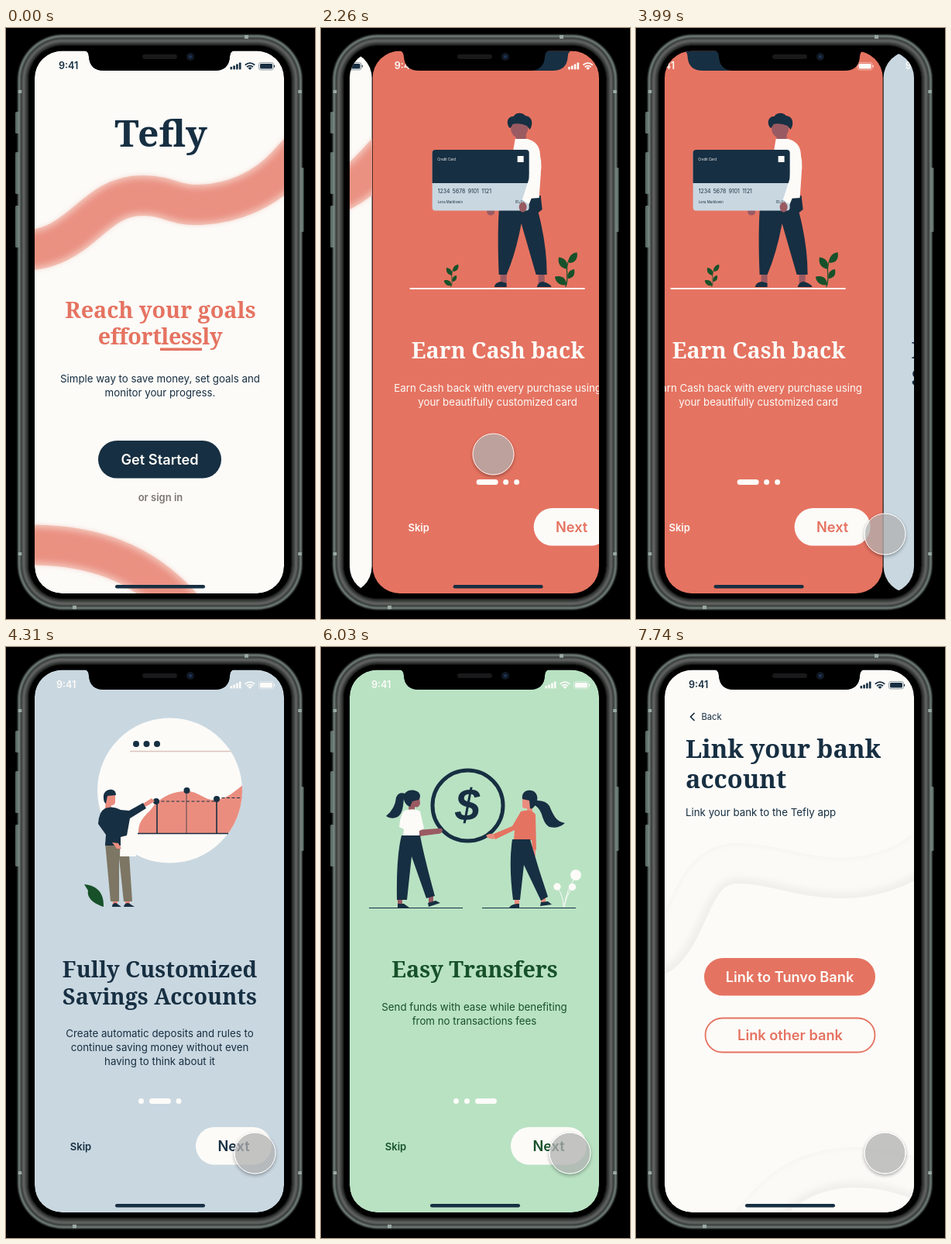
Animation, 399 px wide and 762 px high, one loop 8000 ms. Source, as an HTML page:

```html
<!DOCTYPE html>
<html lang="en">
<head>
<meta charset="utf-8">
<title>Onboarding</title>
<style>
  html, body { margin: 0; width: 100%; height: 100%; overflow: hidden; background: #000; }
  svg { display: block; position: absolute; left: 0; top: 0; }
  svg text { font-family: Inter, "Open Sans", sans-serif; font-size: 13.3px; }
  svg .title { font: 600 28.7px "Noto Serif", serif; }
  svg .big { font-size: 32.5px; }
  svg .logo { font-size: 48px; }
  svg .btn { font-weight: 600; font-size: 18.2px; }
  svg .link { font-weight: 600; font-size: 13px; }
  svg .time { font-weight: 600; font-size: 12.6px; }
  .mid { text-anchor: middle; }
  .navy { fill: #172f42; }
  .coral { fill: #e57361; }
  .cream { fill: #fcfbf8; }
  .green { fill: #17512a; }
  .skin { fill: #9a5a62; }
  .peach { fill: #ea8d7f; }
  .wave path { fill: none; stroke-width: 52; }
  .wave path + path { stroke-width: 45; filter: url(#soft); }
  .line { fill: none; stroke: #172f42; }
  #cursor {
    position: absolute; left: -27.5px; top: -27.5px; width: 52px; height: 52px;
    border: 1.5px solid #fff; border-radius: 50%;
    background: rgba(176, 176, 176, .75); background-clip: padding-box;
    box-shadow: 0 2px 4px rgba(0, 0, 0, .32); visibility: hidden;
  }
</style>
</head>
<body>
<svg width="399" height="762" viewBox="0 0 399 762">
  <defs>
    <clipPath id="screen"><rect x="37" y="29.500" width="322" height="699.500" rx="35"/></clipPath>
    <clipPath id="disc"><circle cx="211.500" cy="185" r="93.500"/></clipPath>
    <filter id="soft" x="-20%" y="-40%" width="140%" height="180%"><feGaussianBlur stdDeviation="4"/></filter>
    <filter id="sheen"><feGaussianBlur stdDeviation=".9"/></filter>
    <path id="notch" d="M98 28Q107 29 107 37Q108 55 127 55H269Q288 55 289 37Q289 29 298 28Z"/>
    <path id="leaf" d="M0 0C-7-3-8-10-5-15C2-12 4-6 0 0Z"/>
    <g id="chrome">
      <use href="#notch" class="navy"/>
      <rect class="navy" x="141" y="718" width="116" height="4.500" rx="2.250"/>
      <g fill="currentColor">
        <rect x="289.500" y="50" width="2.600" height="3.500" rx=".7"/>
        <rect x="293.300" y="48.500" width="2.600" height="5" rx=".7"/>
        <rect x="297.100" y="46.500" width="2.600" height="7" rx=".7"/>
        <rect x="300.900" y="44.500" width="2.600" height="9" rx=".7"/>
        <path d="M315 54l-2.500-2.600q2.500-2 5 0z"/>
        <rect x="328" y="46" width="16" height="6.500" rx="1.500"/>
        <rect x="346" y="47.800" width="1" height="3" rx=".5"/>
      </g>
      <g fill="none" stroke="currentColor">
        <path stroke-width="1.800" d="M308.800 47.800q6.200-5.400 12.400 0M311 50.200q4-3.200 8 0"/>
        <rect x="326.500" y="44.500" width="19" height="9.500" rx="2.800" opacity=".45"/>
      </g>
    </g>
    <g id="next">
      <rect class="cream" x="245" y="619" width="98" height="48.500" rx="24.250"/>
      <text class="btn mid" x="294" y="650" fill="currentColor">Next</text>
    </g>
    <g id="sprig">
      <path d="M0 0C4-8-2-14 4-25" fill="none" stroke="#17512a" stroke-width=".8"/>
      <g class="green">
        <use href="#leaf" transform="translate(3 -20) rotate(55) scale(.7)"/>
        <use href="#leaf" transform="translate(1 -15) rotate(-15) scale(.75)"/>
        <use href="#leaf" transform="translate(2 -7) rotate(52) scale(.6)"/>
        <use href="#leaf" transform="translate(1 -2) rotate(-38) scale(.75)"/>
      </g>
    </g>
  </defs>

  <!-- Phone body -->
  <g fill="#596a64">
    <rect x="12" y="108" width="5" height="28" rx="1.500"/><rect x="12" y="160" width="5" height="54" rx="1.500"/>
    <rect x="12" y="229" width="5" height="54" rx="1.500"/><rect x="380" y="180" width="4.500" height="83" rx="1.500"/>
  </g>
  <g filter="url(#sheen)">
    <rect x="15.500" y="9" width="366.500" height="740.500" rx="58" fill="#84938c"/>
    <rect x="18" y="11.500" width="361.500" height="735.500" rx="55.500" fill="#2a2f2d"/>
    <rect x="21" y="14.500" width="355.500" height="729.500" rx="52.500" fill="#646665"/>
    <rect x="24.500" y="18" width="348.500" height="722.500" rx="49" fill="#3a3c3b"/>
    <rect x="28" y="21.500" width="341.500" height="715.500" rx="45"/>
  </g>
  <path d="M308 11.500h5M86 747h5M18 80v4M379.500 80v4M18 676v4M379.500 676v4" stroke="#9aaba4" stroke-width="4.500"/>

  <g clip-path="url(#screen)">
    <g id="strip">
      <!-- Welcome -->
      <g class="page" clip-path="url(#screen)">
        <rect class="cream" width="399" height="762"/>
        <g class="wave">
          <path d="M10 287C98 292 108 216 176 216C210 216 215 228 245 228C292 228 335 208 362 178L410 126" stroke="#f4cabf"/>
          <path d="M10 287C98 292 108 216 176 216C210 216 215 228 245 228C292 228 335 208 362 178L410 126" stroke="#ea9182"/>
        </g>
        <g class="wave">
          <path d="M10 667C110 662 180 690 232 752" stroke="#f4cabf"/>
          <path d="M10 667C110 662 180 690 232 752" stroke="#ea9182"/>
        </g>
        <use href="#chrome" color="#172f42"/>
        <text class="time navy" x="68" y="53">9:41</text>
        <text class="title logo navy mid" x="200" y="153">Tefly</text>
        <g class="coral mid">
          <text class="title" x="199.500" y="374">Reach your goals</text>
          <text class="title" x="199" y="408" letter-spacing="-.4">effortlessly</text>
          <rect x="199" y="412.500" width="54" height="3.500"/>
        </g>
        <g class="navy mid">
          <text x="199" y="457">Simple way to save money, set goals and</text>
          <text x="199" y="475">monitor your progress.</text>
        </g>
        <rect class="navy" x="119" y="532" width="159" height="48.500" rx="24.250"/>
        <text class="btn cream mid" x="198.500" y="562.500">Get Started</text>
        <text class="link mid" x="199.500" y="609.500" fill="#7d7672">or sign in</text>
      </g>

      <!-- Cash back -->
      <g class="page" clip-path="url(#screen)">
        <rect class="coral" width="399" height="762"/>
        <use href="#chrome" color="#fcfbf8"/>
        <text class="time cream" x="65" y="53">9:41</text>
        <use href="#sprig" x="138" y="334"/>
        <use href="#sprig" transform="translate(286 334) scale(1.550)"/>
        <g class="skin">
          <path d="M202 315h8v14h-8zM251 315h8v14h-8z"/>
          <ellipse cx="189.500" cy="237" rx="5" ry="4.500"/>
          <path d="M222 136h13v14h-13z"/>
          <ellipse cx="226.500" cy="130" rx="11" ry="11.500"/>
        </g>
        <g class="navy">
          <path d="M209 220L254 216L256 234L251 238Q262 280 262 318H248L229 252Q222 290 210 318H200Q198 270 200 236Z"/>
          <path d="M194 334Q195 328 203 327L210 329V334ZM249 334Q251 327 257 327Q267 330 268 334Z"/>
          <path d="M213 128C208 119 214 113 219 114C222 108 232 109 234 113C243 114 245 123 240 131L236 126Q226 122 218 124L215 129Z"/>
        </g>
        <path class="cream" d="M221 143H237Q251 147 253 160L254 190L252 219L208 222Z"/>
        <rect x="114" y="157" width="125" height="78.500" rx="4" fill="#c9d7e0"/>
        <path class="navy" d="M114 200V161Q114 157 118 157H235Q239 157 239 161V200Z"/>
        <text class="cream" x="120.500" y="171" style="font-size:4.400px">Credit Card</text>
        <rect class="cream" x="224" y="165" width="8" height="8"/>
        <text class="navy" x="121" y="213" style="font-size:6.900px;word-spacing:1.500px">1234 5678 9101 1121</text>
        <text class="navy" x="121" y="226" style="font-size:4.300px">Lena Marblewin</text>
        <text class="navy" x="221" y="226" style="font-size:4.300px">05/23</text>
        <ellipse class="skin" cx="231" cy="231" rx="5" ry="6.500"/>
        <path class="cream" d="M241 158L253 162Q257 180 252 196L239 227L230 222L239 194Z"/>
        <path class="cream" d="M85 335h226v2H85z"/>
        <g class="cream mid">
          <text class="title" x="199" y="426">Earn Cash back</text>
          <text x="198.500" y="468.500">Earn Cash back with every purchase using</text>
          <text x="198.500" y="486.500">your beautifully customized card</text>
          <rect x="171" y="582" width="28" height="7" rx="3.500"/>
          <circle cx="209" cy="585.500" r="3.500"/><circle cx="223" cy="585.500" r="3.500"/>
          <text class="link" x="96.500" y="648.500">Skip</text>
        </g>
        <use href="#next" color="#e57361"/>
      </g>

      <!-- Savings -->
      <g class="page" clip-path="url(#screen)">
        <rect width="399" height="762" fill="#c9d7e0"/>
        <use href="#chrome" color="#fcfbf8"/>
        <text class="time cream" x="65" y="53">9:41</text>
        <g clip-path="url(#disc)">
          <path class="cream" d="M110 90h200v190H110z"/>
          <path d="M160 134.500H310" stroke="#dcc4bd" stroke-width="1.500"/>
          <path class="peach" d="M171 240C171 220 183 217 192 203C204 190 222 185 235 186C250 187 258 199 272 197C288 194 292 188 306 178L286 241Z"/>
          <path class="peach" d="M285 196L306 178V241H285Z"/>
          <path class="line" stroke-dasharray="4 2.500" d="M194 199H272M272 194.500H306"/>
        </g>
        <path class="line" stroke-width="1.600" d="M170 240.500H287M195 199V240M272 196V240"/>
        <path class="line" stroke-width=".7" d="M233 186V240"/>
        <g class="navy">
          <circle cx="168" cy="125" r="4"/><circle cx="181.500" cy="125" r="4"/><circle cx="195" cy="125" r="4"/>
          <circle cx="194" cy="199" r="4"/><circle cx="233.500" cy="185" r="4"/><circle cx="272" cy="196" r="4"/>
        </g>
        <path class="green" d="M101 306C114 307 127 314 126 335C113 331 104 323 106 314Z"/>
        <path class="peach" d="M177 202L188 195L192 199L180 206ZM129 190h12v11q-2 4-5 3l-1 6h-7zM138 326h6v6h-6zM154 326h6v6h-6z"/>
        <path d="M128 252H158L163 328H152L146 272L146 328H135Z" fill="#7d7664"/>
        <path class="cream" d="M148 244H168V270H147Z"/>
        <g class="navy">
          <path d="M126 195C125 186 132 183 137 184Q142 185 142 191L131 192L129 202Q126 200 126 195Z"/>
          <path d="M128 208Q138 204 148 210L159 211L177 201L181 208L160 221L156 243L148 245V256H128L129 242L119 228Q120 212 128 208Z"/>
          <path d="M137 335Q137 330 142 330L149 335ZM152 335Q153 330 158 330L166 335Z"/>
        </g>
        <path class="peach" d="M137 252L145 253L149 260L143 260Z"/>
        <g class="navy mid">
          <text class="title" x="198.500" y="426">Fully Customized</text>
          <text class="title" x="198.500" y="461">Savings Accounts</text>
          <text x="198.500" y="503">Create automatic deposits and rules to</text>
          <text x="198.500" y="521">continue saving money without even</text>
          <text x="198.500" y="539">having to think about it</text>
          <text class="link" x="96.500" y="648.500">Skip</text>
        </g>
        <g class="cream">
          <circle cx="174.500" cy="585.500" r="3.500"/><circle cx="223" cy="585.500" r="3.500"/>
          <rect x="185" y="582" width="28" height="7" rx="3.500"/>
        </g>
        <use href="#next" color="#172f42"/>
      </g>

      <!-- Transfers -->
      <g class="page" clip-path="url(#screen)">
        <rect width="399" height="762" fill="#b9e2c3"/>
        <use href="#chrome" color="#fcfbf8"/>
        <text class="time cream" x="65" y="53">9:41</text>
        <circle class="line" cx="189.500" cy="204.500" r="45.500" stroke-width="5"/>
        <text class="navy mid" x="189" y="224" style="font:italic bold 57px 'Liberation Sans',sans-serif">$</text>
        <path class="line" d="M62 336.500H183M208 336.500H329"/>
        <path d="M314 335Q317 312 329 296M313 335Q313 320 305 310M314 335Q317 320 324 311" fill="none" stroke="#fcfbf8"/>
        <g class="cream">
          <circle cx="329" cy="294" r="7"/><circle cx="305" cy="309" r="4.700"/><circle cx="324.500" cy="309.500" r="4.700"/>
        </g>
        <path class="skin" d="M114 193H127L128 202Q126 208 121 206V212H113ZM125 236L151 234Q157 233 157 237Q156 241 150 241L127 244ZM99 323h6v10h-6zM139 320h6v10h-6z"/>
        <path class="cream" d="M107 211Q121 207 128 212L133 234L127 237V244H106L107 235L101 232Q102 218 107 211Z"/>
        <g class="navy">
          <path d="M104 243H128Q133 270 147 321L136 324L117 270L111 326H98Q97 270 104 243Z"/>
          <path d="M99 336V331H107L114 336ZM139 335L138 330L148 327L154 330Z"/>
          <path d="M107 197C105 188 113 183 121 185C128 186 130 193 126 197L118 199L115 206Q109 204 107 197Z"/>
          <path d="M109 189Q100 186 97 194Q96 208 84 218Q91 223 99 219C106 214 106 204 107 195Z"/>
        </g>
        <path class="peach" d="M260 193H273V212H266V208Q259 209 260 202ZM213 243Q219 239 225 242V247Q217 249 213 243ZM273 256h4v14l-3-2zM250 322h6v10h-6zM284 320h6v10h-6z"/>
        <path class="coral" d="M258 212Q272 208 277 216L278 262L273 260L272 249H249L250 236L225 248L223 241L247 231Z"/>
        <g class="navy">
          <path d="M247 248H270Q280 284 293 322L284 327L262 281L257 326H248Q242 280 247 248Z"/>
          <path d="M243 336Q246 331 256 331V336ZM283 334L284 329L293 328L298 332Z"/>
          <path d="M260 196C259 188 264 184 271 185C280 186 282 197 276 205Q272 210 270 208L269 198Z"/>
          <path d="M277 198Q290 197 295 205C301 219 304 225 315 227Q306 235 295 232C284 226 288 211 276 204Z"/>
        </g>
        <g class="green mid">
          <text class="title" x="198.500" y="426">Easy Transfers</text>
          <text x="198" y="468.500">Send funds with ease while benefiting</text>
          <text x="198" y="486.500">from no transactions fees</text>
          <text class="link" x="96.500" y="648.500">Skip</text>
        </g>
        <g class="cream">
          <circle cx="174.500" cy="585.500" r="3.500"/><circle cx="188.500" cy="585.500" r="3.500"/>
          <rect x="199" y="582" width="28" height="7" rx="3.500"/>
        </g>
        <use href="#next" color="#17512a"/>
      </g>

      <!-- Link bank -->
      <g class="page" clip-path="url(#screen)">
        <rect class="cream" width="399" height="762"/>
        <g class="wave">
          <path d="M20 402C72 380 65 279 130 279C180 279 210 298 265 298C300 298 340 288 370 263" stroke="#f1efeb"/>
          <path d="M16 399C68 377 61 276 130 275C180 275 210 294 265 294C300 294 340 284 374 256" stroke="#fbfaf7"/>
        </g>
        <g class="wave">
          <path d="M150 742C190 690 230 672 280 671C320 671 350 680 370 690" stroke="#f1efeb"/>
          <path d="M146 740C186 687 230 668 280 667C320 667 350 676 376 688" stroke="#fbfaf7"/>
        </g>
        <use href="#chrome" color="#172f42"/>
        <g class="navy">
          <text class="time" x="68" y="53">9:41</text>
          <path class="line" stroke-width="1.700" d="M75.500 85L70.500 90L75.500 95"/>
          <text x="84.500" y="94" style="font-size:11.200px">Back</text>
          <text class="title big" x="64" y="143">Link your bank</text>
          <text class="title big" x="64" y="182">account</text>
          <text x="64" y="217.500">Link your bank to the Tefly app</text>
        </g>
        <rect class="coral" x="88" y="401" width="221" height="48.500" rx="24.250"/>
        <text class="btn cream mid" x="198.500" y="432">Link to Tunvo Bank</text>
        <rect x="89.500" y="478.500" width="219" height="44" rx="22" fill="none" stroke="#e57361" stroke-width="1.800"/>
        <text class="btn coral mid" x="199" y="507">Link other bank</text>
      </g>
    </g>
  </g>

  <!-- Notch hardware -->
  <use href="#notch"/>
  <rect x="176" y="34" width="45" height="6" rx="3" fill="#19191b"/>
  <circle cx="238" cy="37" r="5" fill="#111925"/><circle cx="238" cy="37" r="2" fill="#1f3558"/>
</svg>
<div id="cursor"></div>

<script>
  const LOOP = 8000, PAGE = 323;
  const pushes = [[1850, 2400, 8], [3840, 4310, 7], [5640, 6030, 6], [7420, 7740, 5]];
  const strip = document.getElementById('strip');
  const cursor = document.getElementById('cursor');

  // Progress 0..1 in n jumps, the first at a and the last at b
  const jump = (t, a, b, n) =>
    t < a ? 0 : t >= b ? 1 : (Math.floor((t - a) / (b - a) * (n - 1)) + .5) / (n - 1);
  const inOut = p => p < .5 ? 2 * p * p : 1 - 2 * (1 - p) ** 2;
  const bend = (a, b, c, p) => (1 - p) ** 2 * a + 2 * p * (1 - p) * b + p * p * c;

  function cursorAt(t) {
    if (t < 2900) {
      const left = 1 - jump(t, 430, 1250, 11);
      return [222.5 + 207 * left, 549.5 + 245 * left ** 1.2];
    }
    const p = inOut(jump(t, 2900, 3380, 7));
    return [bend(222.5, 391, 321.5, p), bend(549.5, 601, 652.5, p)];
  }

  function draw(now) {
    const t = now % LOOP;
    const shift = pushes.reduce((sum, [a, b, n]) => sum + inOut(jump(t, a, b, n)), 0);
    strip.setAttribute('transform', `translate(${-PAGE * shift})`);

    const [x, y] = cursorAt(t);
    cursor.style.visibility = t < 430 ? 'hidden' : 'visible';
    cursor.style.transform = `translate(${x}px, ${y}px)`;
  }

  document.querySelectorAll('.page').forEach((page, i) =>
    page.setAttribute('transform', `translate(${PAGE * i})`));

  const start = performance.now();
  function tick() {
    draw(performance.now() - start);
    requestAnimationFrame(tick);
  }
  tick();
</script>
</body>
</html>
```
